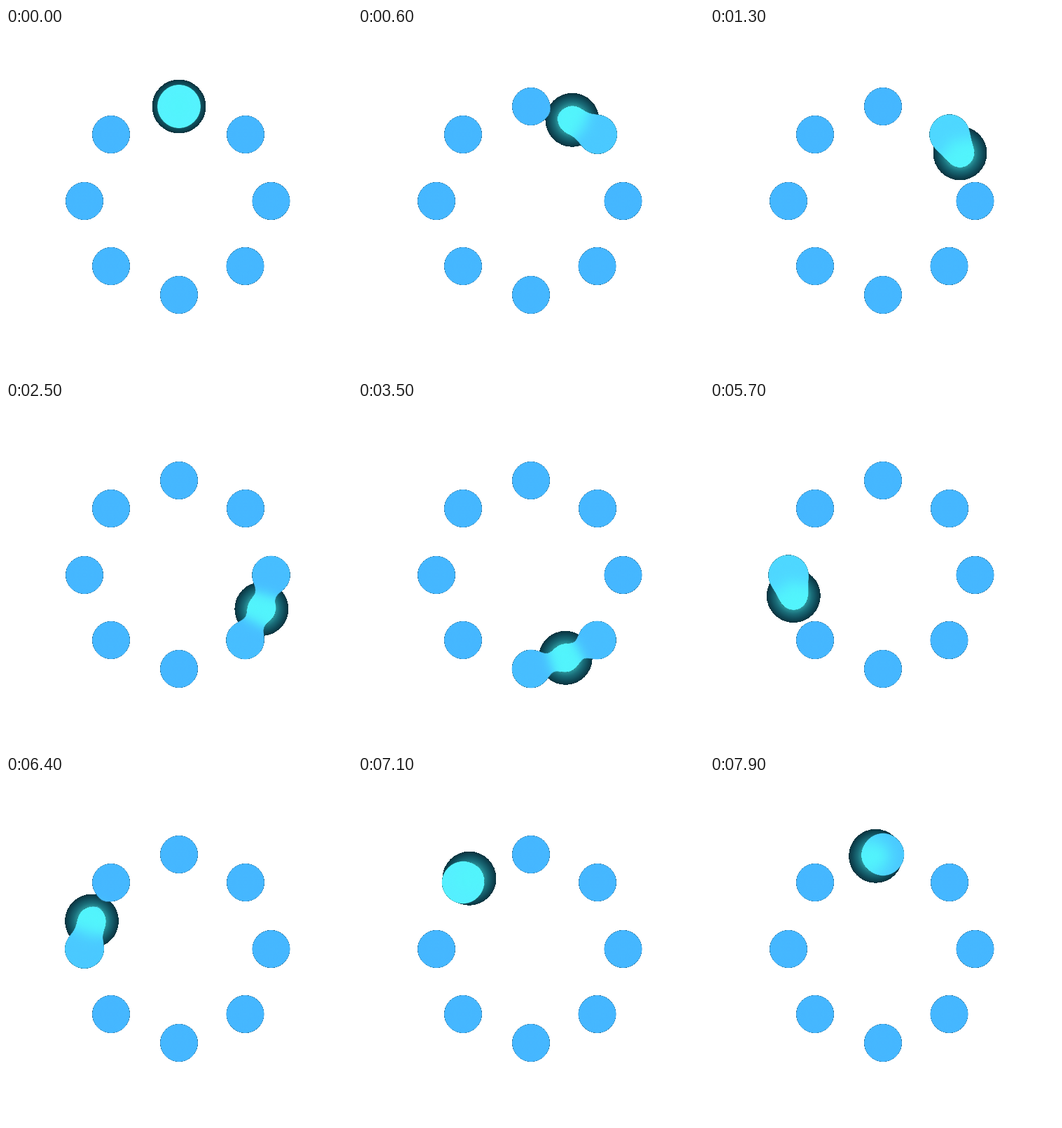
An HTML page that plays this animation: 494 by 494 pixels, repeating every 8000 ms.

```html
<!DOCTYPE html>
<html lang="en">
<head>
<meta charset="utf-8">
<title>Gooey loader</title>
<style>
  html, body { margin: 0; width: 100%; height: 100%; overflow: hidden; background: #fff; }
  svg { display: block; width: 100vw; height: 100vh; }
</style>
</head>
<body>
<svg viewBox="0 0 494 494">
  <defs>
    <!-- Blur and threshold; a hard black base gives the thin dark rim -->
    <filter id="goo" filterUnits="userSpaceOnUse" x="0" y="0" width="494" height="494"
            color-interpolation-filters="sRGB">
      <feGaussianBlur stdDeviation="9.5" result="soft"/>
      <feColorMatrix in="soft" result="rim"
        values="0 0 0 0 0  0 0 0 0 0  0 0 0 0 0  0 0 0 300 -121"/>
      <feColorMatrix in="soft" result="body"
        values="1 0 0 0 0  0 1 0 0 0  0 0 1 0 0  0 0 0 25 -9.7"/>
      <feMerge>
        <feMergeNode in="rim"/>
        <feMergeNode in="body"/>
      </feMerge>
    </filter>
    <radialGradient id="glow">
      <stop offset=".5" stop-color="#2c999f"/>
      <stop offset=".68" stop-color="#1a6c78"/>
      <stop offset=".85" stop-color="#104c5a"/>
      <stop offset="1" stop-color="#0a323d"/>
    </radialGradient>
  </defs>
  <circle id="halo" r="38.5" fill="url(#glow)" shape-rendering="crispEdges"/>
  <g id="dots" filter="url(#goo)">
    <circle id="ball" r="20.4" fill="#52f4fc"/>
  </g>
</svg>
<script>
  const LOOP = 8000, TICK = 100;
  const BLUE = [69, 183, 255], CYAN = [86, 242, 255];
  const SPOTS = [[247, 112], [342, 152], [378.5, 247], [341.5, 340],
                 [247, 381], [150, 340], [112, 247], [150, 152]];
  const halo = document.getElementById('halo');
  const ball = document.getElementById('ball');
  const group = document.getElementById('dots');

  const set = (el, attrs) => {
    for (const key in attrs) el.setAttribute(key, attrs[key]);
  };
  const lerp = (a, b, k) => a + (b - a) * k;
  const mix = k => `rgb(${BLUE.map((c, i) => Math.round(lerp(c, CYAN[i], k)))})`;

  const dots = SPOTS.map(([cx, cy]) => {
    const dot = document.createElementNS('http://www.w3.org/2000/svg', 'circle');
    set(dot, { cx, cy });
    group.insertBefore(dot, ball);
    return dot;
  });

  // From dot to dot along a chord that bulges outward
  function place(step) {
    const i = Math.floor(step), p = step - i;
    const a = SPOTS[i], b = SPOTS[(i + 1) % 8];
    const out = (i + 0.5) * Math.PI / 4, bulge = 21 * p * (1 - p);
    return {
      cx: lerp(a[0], b[0], p) + bulge * Math.sin(out),
      cy: lerp(a[1], b[1], p) - bulge * Math.cos(out)
    };
  }

  function draw(ms) {
    const step = ms / 1000, pos = place(step);
    set(halo, pos);
    set(ball, pos);

    dots.forEach((dot, i) => {
      const gap = Math.abs(step - i), near = Math.min(gap, 8 - gap);
      let tint = near < 0.64 ? (1 + Math.cos(Math.PI * near / 0.64)) / 2 : 0;
      if (i === 0 && step > 7) tint *= 0.3; // the top dot warms up only on arrival
      set(dot, { r: 26.4 + Math.max(0, 3.8 - 7 * near), fill: mix(tint) });
    });
  }

  const start = performance.now();
  let last = -1;
  function frame() {
    const ms = Math.floor((performance.now() - start) % LOOP / TICK) * TICK;
    if (ms !== last) draw(last = ms);
    requestAnimationFrame(frame);
  }
  frame();
</script>
</body>
</html>
```
